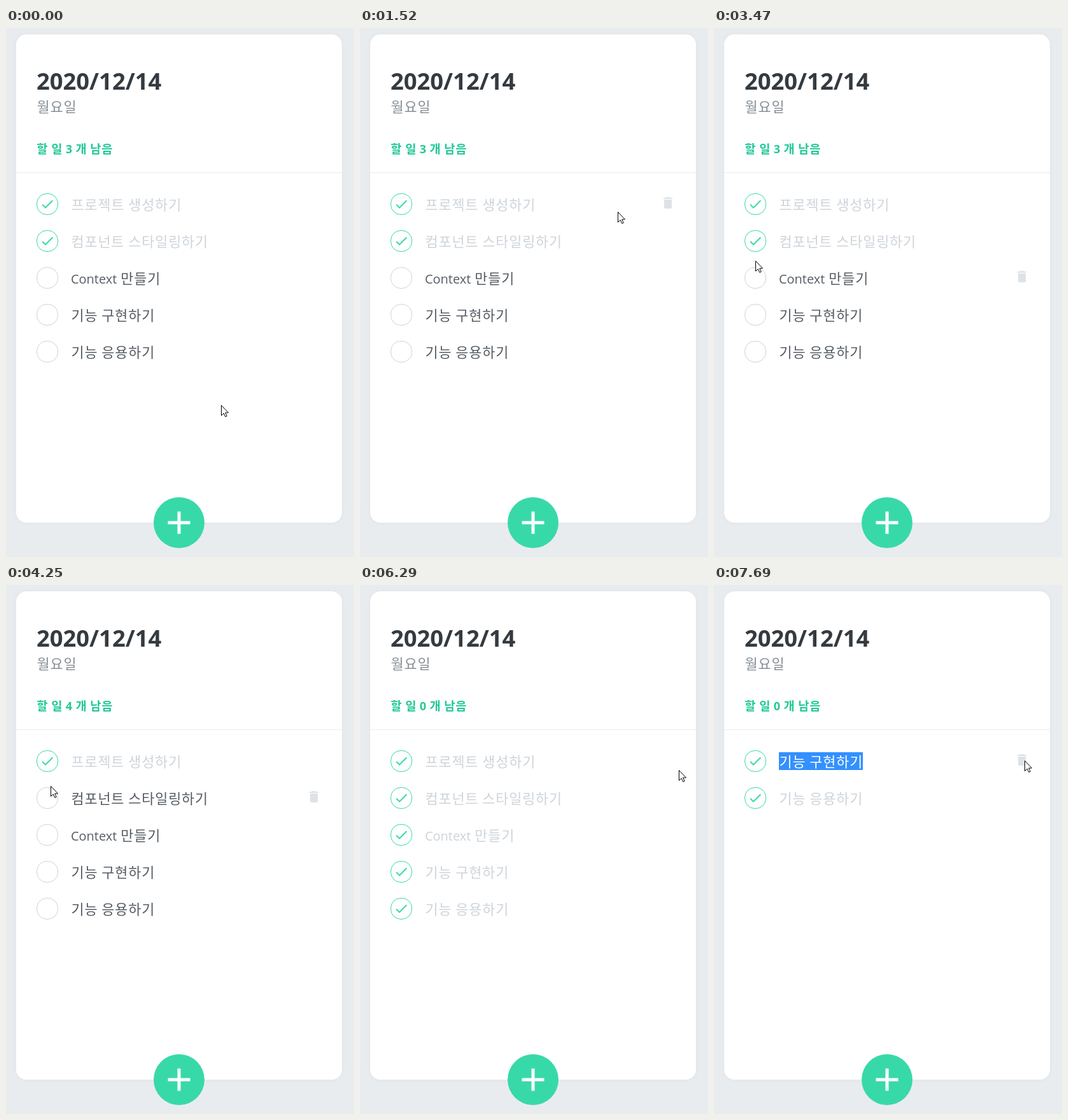
An HTML page with a canvas that plays this animation: 547x832 px, repeating every 8 s.

```html
<!DOCTYPE html>
<html lang="ko">
<head>
<meta charset="utf-8">
<title>할 일</title>
<style>
  html, body { margin: 0; width: 100%; height: 100%; overflow: hidden; background: #e9ecef; }
  canvas { display: block; }
</style>
</head>
<body>
<canvas id="stage" width="547" height="832"></canvas>
<script>
const ctx = document.getElementById('stage').getContext('2d');
const LOOP = 8000, REFRESH = 78, PHASE = 1520 % REFRESH;
const ROW = 58, TOP = 277;
const GREEN = '#38d9a9', PALE = '#ced4da', LINE = '#e9ecef';
const TASKS = ['프로젝트 생성하기', '컴포넌트 스타일링하기', 'Context 만들기', '기능 구현하기', '기능 응용하기'];

const icon = {
  add: new Path2D('M19 13h-6v6h-2v-6H5v-2h6V5h2v6h6z'),
  done: new Path2D('M9 16.2L4.8 12l-1.4 1.4L9 19 21 7l-1.4-1.4z'),
  trash: new Path2D('M6 19c0 1.1.9 2 2 2h8c1.1 0 2-.9 2-2V7H6zM19 4h-3.5l-1-1h-5l-1 1H5v2h14z'),
  arrow: new Path2D('M.5.5V16.5L4.2 13L6.8 18.5L9.2 17.4L6.7 12H11.5z'),
  hand: new Path2D('M5.5 14V2a1.6 1.6 0 0 1 3.2 0V9a1.5 1.5 0 0 1 2.9.3a1.5 1.5 0 0 1 2.9.6a1.4 1.4 0 0 1 2.6.9V15c0 3-1.6 4.5-2 6v2H7.5v-2C6.5 19 3.5 16.5 1 12.8a1.6 1.6 0 0 1 2.4-2.1z')
};

// Pointer moves: start, end, x, y
const REST = { x: 338, y: 593 };
const MOVES = [
  [800, 1520, 405, 289], [1540, 1620, 210, 290], [1680, 2540, 66, 278],
  [3000, 3460, 65, 366], [3540, 3620, 66, 332], [4090, 4250, 70, 316],
  [4500, 4720, 63, 390], [4880, 5180, 60, 449], [5280, 5580, 72, 505],
  [5740, 6110, 517, 296], [6200, 6270, 501, 291], [6300, 6450, 488, 276]
];
const CLICKS = [2610, 2920, 3860, 4400, 4790, 5270, 5730, 6910, 7220, 7610];

const ease = k => k * k * (3 - 2 * k);

function pointerAt(t) {
  let { x, y } = REST;
  for (const [a, b, u, v] of MOVES) {
    const k = ease(Math.min(1, Math.max(0, (t - a) / (b - a))));
    x += (u - x) * k;
    y += (v - y) * k;
  }
  return { x: Math.round(x), y: Math.round(y) };
}

// What lies under the pointer: row number and part of the row
function hit({ x, y }, count) {
  const row = Math.round((y - TOP) / ROW);
  if (x < 48 || x >= 496 || row < 0 || row >= count) return { row: -1 };
  const onCircle = x < 82 && Math.abs(y - TOP - row * ROW) <= 20;
  return { row, part: onCircle ? 'circle' : x >= 472 ? 'trash' : 'label' };
}

// Replays every click up to t
function stateAt(t) {
  const tasks = TASKS.map((label, i) => ({ label, done: i < 2 }));
  let removed = 0, last = 0;
  for (const at of CLICKS.filter(c => c <= t)) {
    const { row, part } = hit(pointerAt(at), tasks.length);
    if (part === 'circle') tasks[row].done = !tasks[row].done;
    if (part === 'trash') {
      tasks.splice(row, 1);
      removed++;
    }
    last = at;
  }
  // Repeated clicks in one place select the first label
  return { tasks, selected: removed > 1 && t - last >= 60 };
}

// Hangul sits on a square grid of the font size; other text flows naturally
function text(str, x, y, size, color, { bold = false, back } = {}) {
  const left = x;
  const runs = str.match(/[가-힣]+| |[^ 가-힣]+/g).map(run => {
    const hangul = /[가-힣]/.test(run), at = x;
    const font = hangul
      ? `${bold ? 700 : 300} ${size * 1.04}px "Noto Sans CJK KR", "Noto Sans CJK", sans-serif`
      : `${bold ? 700 : 400} ${size * (bold ? 1 : .95)}px "Open Sans", "Noto Sans", sans-serif`;
    const spacing = hangul ? `${size * .043}px` : '0px';
    ctx.font = font;
    ctx.letterSpacing = spacing;
    x += run === ' ' ? size * .274 : hangul ? run.length * size : ctx.measureText(run).width;
    return { run, font, spacing, at: hangul ? at + size * .02 : at };
  });
  if (back) {
    ctx.fillStyle = back;
    ctx.fillRect(left, y - 23, Math.round(x - left), 28);
  }
  ctx.fillStyle = color;
  for (const { run, font, spacing, at } of runs) {
    ctx.font = font;
    ctx.letterSpacing = spacing;
    ctx.fillText(run, at, y);
  }
}

function fillIcon(path, x, y, color, scale = 1) {
  ctx.save();
  ctx.translate(x, y);
  ctx.scale(scale, scale);
  ctx.fillStyle = color;
  ctx.fill(path);
  ctx.restore();
}

function box(x, y, w, h, r) {
  ctx.beginPath();
  ctx.roundRect(x, y, w, h, r);
}

function drawCard(left) {
  ctx.fillStyle = LINE;
  ctx.fillRect(0, 0, 547, 832);
  ctx.save();
  ctx.shadowColor = 'rgba(0,0,0,.04)';
  ctx.shadowBlur = 8;
  ctx.fillStyle = '#fff';
  box(16, 10, 512, 768, 16);
  ctx.fill();
  ctx.restore();
  ctx.fillStyle = LINE;
  ctx.fillRect(16, 227, 512, 1);
  text('2020/12/14', 48, 97, 36.4, '#343a40', { bold: true });
  text('월요일', 48, 132, 21, '#868e96');
  text(`할 일 ${left} 개 남음`, 48, 197, 18, '#20c997', { bold: true });
  ctx.fillStyle = GREEN;
  ctx.beginPath();
  ctx.arc(272, 778, 40, 0, 2 * Math.PI);
  ctx.fill();
  fillIcon(icon.add, 242, 748, '#fff', 2.5);
}

function drawTask({ label, done }, y, selected) {
  ctx.lineWidth = 1;
  ctx.strokeStyle = done ? GREEN : PALE;
  box(48.5, y - 16.5, 33, 33, 15.5);
  ctx.stroke();
  if (done) fillIcon(icon.done, 53, y - 12, GREEN);
  const color = selected ? '#fff' : done ? PALE : '#555c63';
  text(label, 102, y + 9, 21, color, { back: selected && '#3390ff' });
}

function drawPointer({ x, y }, hand) {
  const shape = hand ? icon.hand : icon.arrow;
  ctx.save();
  ctx.translate(hand ? x - 7 : x, y);
  ctx.fillStyle = '#fff';
  ctx.strokeStyle = '#000';
  ctx.lineWidth = 1;
  ctx.fill(shape);
  ctx.stroke(shape);
  if (hand) {
    for (const fx of [8.7, 11.6, 14.5]) {
      ctx.beginPath();
      ctx.moveTo(fx, 9.5);
      ctx.lineTo(fx, 12.5);
      ctx.stroke();
    }
  }
  ctx.restore();
}

function draw(time) {
  // The screen only refreshes in fixed steps
  const t = PHASE + REFRESH * Math.floor((time - PHASE) / REFRESH);
  const { tasks, selected } = stateAt(t);
  const pointer = pointerAt(t);
  const { row, part } = hit(pointer, tasks.length);

  drawCard(tasks.filter(task => !task.done).length);
  tasks.forEach((task, i) => drawTask(task, TOP + i * ROW, selected && i === 0));
  if (row >= 0) fillIcon(icon.trash, 472, TOP + row * ROW - 14, '#dee2e6');
  drawPointer(pointer, part === 'circle' && Math.abs(pointer.y - TOP - row * ROW) <= 17);
}

const start = performance.now();
function tick() {
  draw((performance.now() - start) % LOOP);
  requestAnimationFrame(tick);
}
tick();
</script>
</body>
</html>
```
